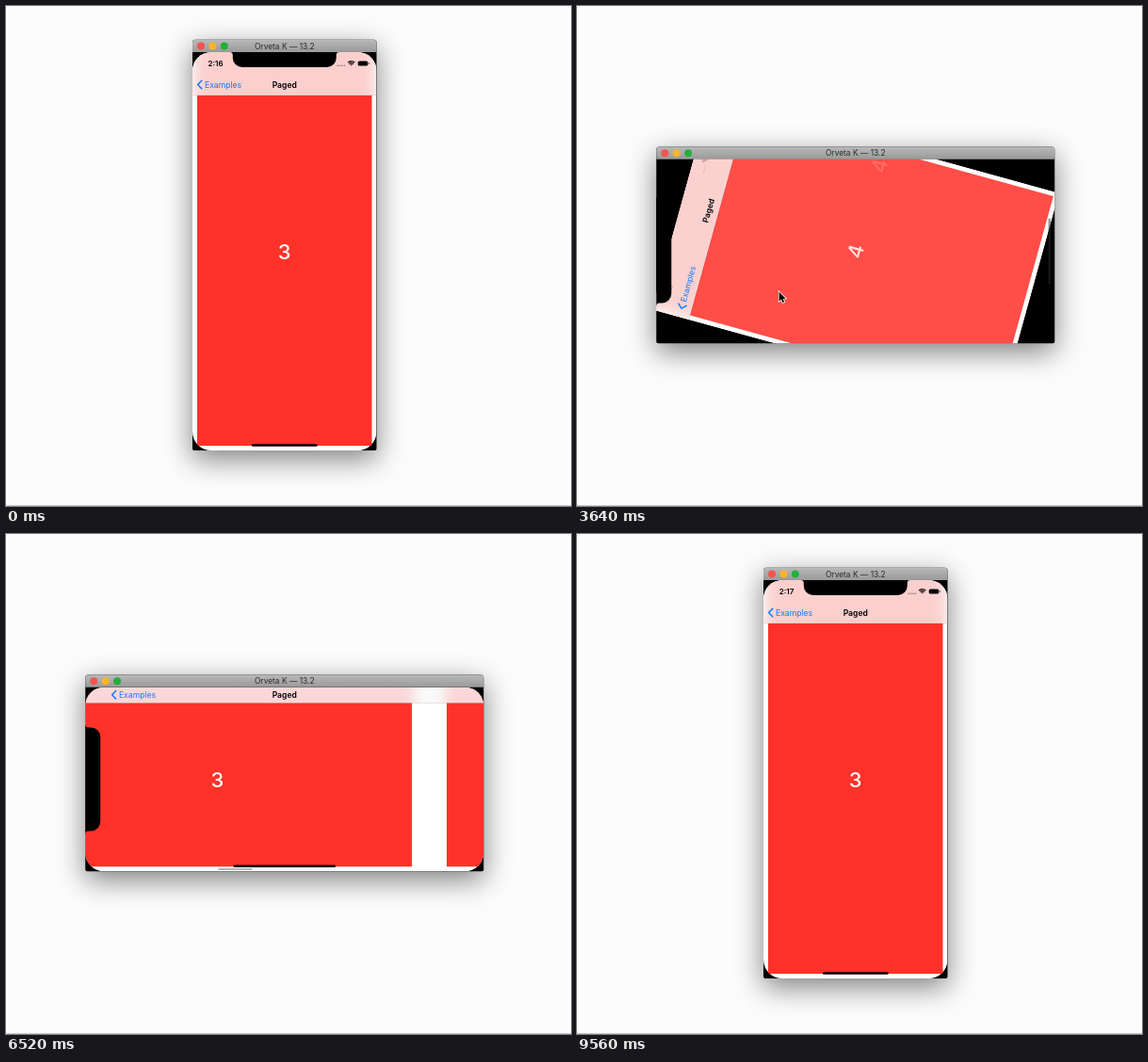
Animation of 600 by 531 pixels, one loop 10000 ms. Source, as an HTML page with a canvas:

```html
<!DOCTYPE html>
<html lang="en">
<head>
<meta charset="utf-8">
<title>Paged</title>
<style>
  html, body { margin: 0; width: 100%; height: 100%; overflow: hidden; background: #fdfcfd; }
  canvas { display: block; }
</style>
</head>
<body>
<canvas id="stage" width="600" height="531"></canvas>
<script>
const ctx = document.getElementById('stage').getContext('2d');
const LOOP = 10000, SHORT = 195.5, LONG = 423, TITLE_H = 13.2;
const CX = 295.75, CY = 260.5, GAP = 37, MARGIN = 5;
const TO_LANDSCAPE = 3400, TO_PORTRAIT = 8040;
const RED = '#ff3229';

const clamp = v => Math.min(1, Math.max(0, v));
const lerp = (a, b, k) => a + (b - a) * k;
const smooth = v => { v = clamp(v); return v * v * (3 - 2 * v); };
const ramp = (t, from, to) => clamp((t - from) / (to - from));

// Finger drag, then a critically damped snap to the next page.
function swipe(ms) {
  const drag = 0.35 * smooth(ms / 460);
  if (ms < 460) return drag;
  const k = (ms - 460) / 125;
  return 1 - 0.65 * (1 + k) * Math.exp(-k);
}

function fillRound(x, y, w, h, r, color) {
  ctx.fillStyle = color;
  ctx.beginPath();
  ctx.roundRect(x, y, w, h, r);
  ctx.fill();
}

function text(str, x, y, size, weight, color, align = 'center') {
  ctx.font = `${weight} ${size}px Inter, sans-serif`;
  ctx.textAlign = align;
  ctx.textBaseline = 'alphabetic';
  ctx.fillStyle = color;
  ctx.fillText(str, x, y + size * 0.364);
}

function rotated(angle, draw) {
  ctx.save();
  ctx.translate(CX, CY);
  ctx.rotate(angle);
  draw();
  ctx.restore();
}

function withAlpha(alpha, draw) {
  if (alpha <= 0) return;
  ctx.save();
  ctx.globalAlpha *= alpha;
  draw();
  ctx.restore();
}

function drawWindow(w, h) {
  const x = CX - w / 2, y = CY - h / 2 - TITLE_H;
  ctx.save();
  ctx.shadowColor = 'rgba(0,0,0,.5)';
  ctx.shadowBlur = 30;
  ctx.shadowOffsetY = 9;
  fillRound(x, y, w, h + TITLE_H, [3, 3, 2, 2], '#000');
  ctx.restore();
  const shade = ctx.createLinearGradient(0, y, 0, y + TITLE_H);
  shade.addColorStop(0, '#b9b9b9');
  shade.addColorStop(1, '#999');
  fillRound(x, y, w, TITLE_H, [3, 3, 0, 0], shade);
  ['#f4544d', '#f8b52c', '#23b03a'].forEach((color, i) =>
    fillRound(x + 5 + i * 12.4, y + 2.7, 8, 8, 4, color));
  text('Orveta K — 13.2', CX, y + 6.7, 8.4, 400, '#2b2b2b');
}

function drawStatus(clock) {
  text(clock, 24.5, 12, 8, 600, '#000');
  ctx.fillStyle = 'rgba(0,0,0,.4)';
  for (let i = 0; i < 4; i++) ctx.fillRect(153.5 + i * 2.4, 13.6, 1.4, 1.4);
  ctx.strokeStyle = '#000';
  ctx.lineWidth = 1.2;
  for (const r of [1, 3, 5]) {
    ctx.beginPath();
    ctx.arc(168.7, 14.6, r, -Math.PI * 0.76, -Math.PI * 0.24);
    ctx.stroke();
  }
  fillRound(175.7, 9.4, 10.6, 5.2, 1.6, '#000');
  fillRound(187, 11, 0.9, 2, 0.4, '#555');
}

// Pages as [index, left] pairs near the visible area.
function visiblePages(scroll, w) {
  const first = Math.floor(scroll);
  return [first, first + 1].map(n => [n, MARGIN + (n - scroll) * (w + GAP - 2 * MARGIN)]);
}

function drawBar(pages, w, barH, m, clock) {
  ctx.save();
  ctx.beginPath();
  ctx.rect(0, 0, w, barH);
  ctx.clip();
  ctx.fillStyle = '#fafafa';
  ctx.fillRect(0, 0, w, barH);
  ctx.globalAlpha = lerp(0.21, 0.17, m);
  ctx.filter = 'blur(7px)';
  ctx.fillStyle = RED;
  for (const [, x] of pages) ctx.fillRect(x - 2, -30, w - 2 * MARGIN + 4, barH + 60);
  ctx.restore();
  ctx.fillStyle = 'rgba(0,0,0,.18)';
  ctx.fillRect(0, barH - 0.3, w, 0.5);

  const left = lerp(5, 27.7, m), y = lerp(34.5, 8, m);
  ctx.strokeStyle = '#0a7aff';
  ctx.lineWidth = 1.5;
  ctx.beginPath();
  ctx.moveTo(left + 5.2, y - 4.7);
  ctx.lineTo(left + 0.7, y);
  ctx.lineTo(left + 5.2, y + 4.7);
  ctx.stroke();
  text('Examples', left + 8, y, 8.6, 400, '#0a7aff', 'left');
  text('Paged', w / 2, y, 8.6, 600, '#000');
  withAlpha(1 - 4 * m, () => drawStatus(clock));
}

function drawContent(t, w, h, m, p, targetW) {
  const scroll = t < TO_LANDSCAPE ? 3 + swipe(t - 1280) : 4 - swipe(t - 5720);
  const pages = visiblePages(scroll, w);
  ctx.save();
  ctx.translate(-w / 2, -h / 2);
  ctx.beginPath();
  ctx.rect(0, 0, w, h);
  ctx.clip();
  ctx.fillStyle = '#fff';
  ctx.fillRect(0, 0, w, h);

  // While turning, the old page fades out as the new layout fades in.
  const pageW = w - 2 * MARGIN;
  for (const [n, x] of pages) {
    const mid = x + pageW / 2;
    withAlpha(1 - p * (1 - p), () => {
      ctx.fillStyle = RED;
      ctx.fillRect(x, MARGIN, pageW, h - 2 * MARGIN);
    });
    withAlpha(1 - p, () => text(n, mid, h / 2, 22, 500, '#fff'));
    withAlpha(p, () => text(n, mid + (targetW - w) / 2, h / 2, 22, 500, '#fff'));
  }
  drawBar(pages, w, lerp(46, 17, m), m, t < 800 ? '2:16' : '2:17');

  const flash = [[1280, 3400], [5720, 7450], [TO_PORTRAIT - 100, 9100]]
    .reduce((a, [on, off]) => Math.max(a, ramp(t, on, on + 80) - ramp(t, off, off + 130)), 0);
  withAlpha(flash, () => {
    const upright = t < TO_PORTRAIT ? 1.5 + 20.4 * scroll : 40;
    fillRound(lerp(upright, 21 + 38 * scroll, m), h - 3.1, lerp(19, 36.5, m), 1.6, 0.8, 'rgba(0,0,0,.38)');
  });
  ctx.restore();
}

function drawNotch() {
  const top = -LONG / 2, half = 55, depth = 16;
  ctx.fillStyle = '#000';
  ctx.beginPath();
  ctx.moveTo(-half - 3, top - 1);
  ctx.lineTo(-half - 3, top);
  ctx.quadraticCurveTo(-half, top, -half, top + 3);
  ctx.arcTo(-half, top + depth, 0, top + depth, 10);
  ctx.arcTo(half, top + depth, half, top, 10);
  ctx.lineTo(half, top + 3);
  ctx.quadraticCurveTo(half, top, half + 3, top);
  ctx.lineTo(half + 3, top - 1);
  ctx.fill();
}

function drawHomeBar(land, angle, alpha, color) {
  const len = land ? 108.5 : 70, h = land ? SHORT : LONG;
  withAlpha(alpha, () => rotated(angle, () =>
    fillRound(-len / 2, h / 2 - 6.8, len, 2.6, 1.3, color)));
}

function drawPointer(t) {
  if (t < 120 || t > 4720) return;
  const k = smooth((t - 80) / 1000);
  ctx.save();
  ctx.translate(lerp(601, 214.6, k), lerp(236, 303.6, k));
  ctx.beginPath();
  [[0, 0], [0, 10], [2.3, 7.9], [3.8, 11.4], [5.5, 10.7], [4, 7.3], [7, 7.1]]
    .forEach(([x, y]) => ctx.lineTo(x, y));
  ctx.closePath();
  ctx.lineWidth = 1.5;
  ctx.strokeStyle = '#fff';
  ctx.stroke();
  ctx.fillStyle = '#000';
  ctx.fill();
  ctx.restore();
}

function draw(t) {
  const land = t >= TO_LANDSCAPE && t < TO_PORTRAIT;
  const since = t < TO_LANDSCAPE ? 1e4 : t - (land ? TO_LANDSCAPE : TO_PORTRAIT);
  const p = smooth((since - 75) / 630);
  const m = land ? p : 1 - p;
  const quarter = (land ? -1 : 1) * Math.PI / 2;
  const winW = land ? LONG : SHORT, winH = land ? SHORT : LONG;
  const deviceAngle = land ? -Math.PI / 2 : 0;

  ctx.fillStyle = '#fdfcfd';
  ctx.fillRect(0, 0, 600, 531);
  ctx.fillStyle = '#c9c9c9';
  ctx.fillRect(0, 530, 600, 1);
  drawWindow(winW, winH);

  ctx.save();
  ctx.beginPath();
  ctx.roundRect(CX - winW / 2, CY - winH / 2, winW, winH, 20);
  ctx.clip();
  rotated(quarter * (1 - p), () =>
    drawContent(t, lerp(SHORT, LONG, m), lerp(LONG, SHORT, m), m, p, winW));
  rotated(deviceAngle, drawNotch);
  ctx.restore();

  drawHomeBar(!land, quarter, 1 - ramp(since, 60, 400), since > 60 ? '#2a2a2a' : '#000');
  drawHomeBar(land, 0, ramp(since, 640, 740), '#000');
  drawPointer(t);
}

const begin = performance.now();
function tick() {
  draw((performance.now() - begin) % LOOP);
  requestAnimationFrame(tick);
}
tick();
</script>
</body>
</html>
```
